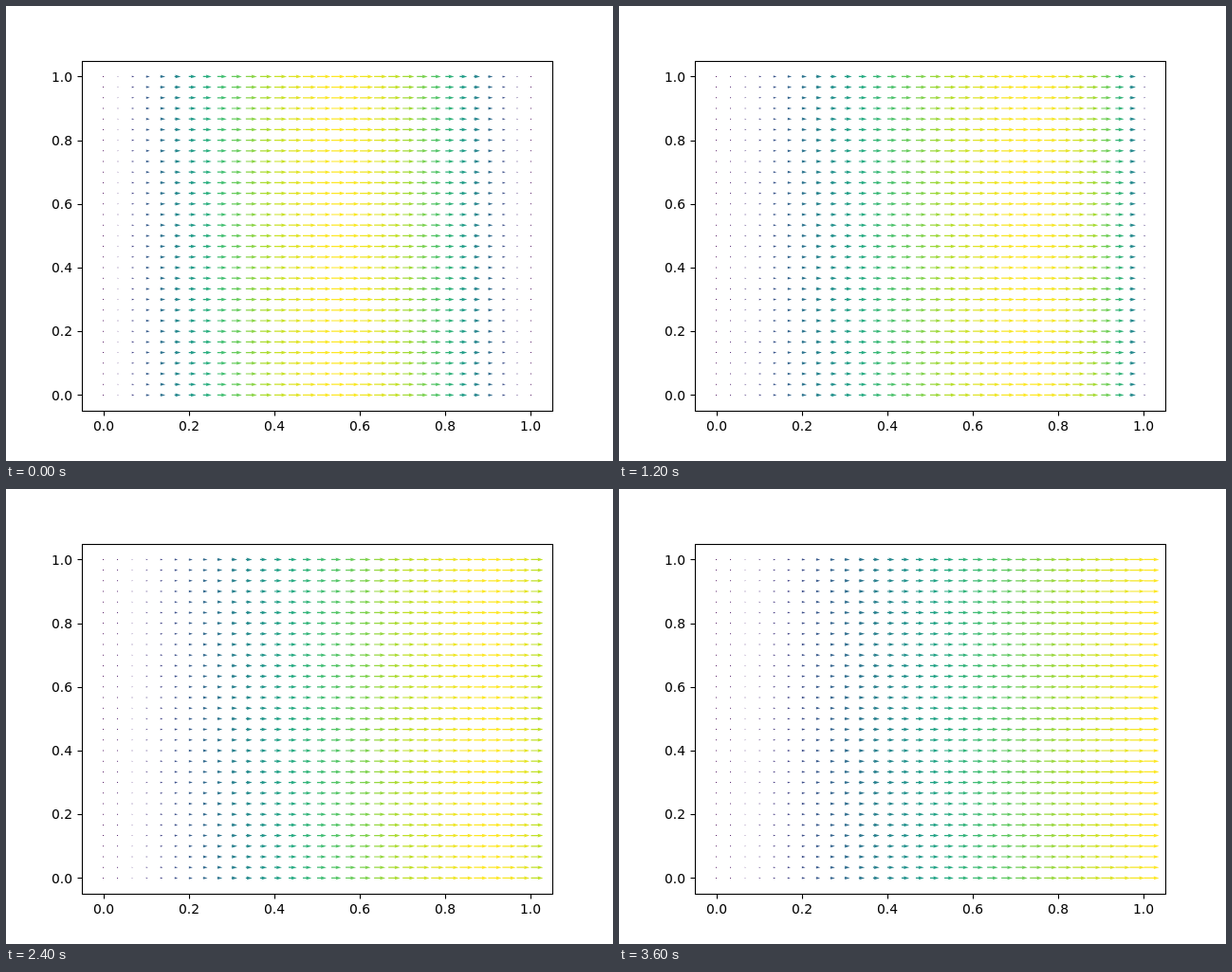
Animation, 640 px wide and 480 px high, one loop 3800 ms. Source, as an HTML page with a canvas:

```html
<!DOCTYPE html>
<html lang="en">
<head>
<meta charset="utf-8">
<title>Vector field</title>
<style>
  html, body { margin: 0; width: 100%; height: 100%; overflow: hidden; background: #fff; }
  canvas { display: block; }
</style>
</head>
<body>
<canvas id="stage" width="640" height="480"></canvas>
<script>
const ctx = document.getElementById('stage').getContext('2d');

const CELLS = 30, STEPS = 19, STEP_MS = 200;
const AXES = { left: 80, right: 576, top: 57.6, bottom: 427.2 };
const AXES_WIDTH = AXES.right - AXES.left;
const SHAFT = 0.0024 * AXES_WIDTH;
const HEAD = 5, HEAD_AXIS = 4.5, HEAD_HALF = 1.5;

const VIRIDIS = ['440154', '482576', '414487', '35608d', '2a788e', '21908c',
                 '22a884', '43bf71', '7ad151', 'bbdf27', 'fde725']
  .map(hex => [0, 2, 4].map(i => parseInt(hex.slice(i, i + 2), 16)));

const toX = v => AXES.left + AXES_WIDTH * (v + 0.05) / 1.1;
const toY = v => AXES.bottom - (AXES.bottom - AXES.top) * (v + 0.05) / 1.1;
const snap = v => Math.floor(v + 0.5) + 0.5;

function colour(t) {
  const pos = Math.max(0, Math.min(1, t)) * (VIRIDIS.length - 1);
  const i = Math.min(Math.floor(pos), VIRIDIS.length - 2);
  const rgb = VIRIDIS[i].map((c, k) => Math.round(c + (VIRIDIS[i + 1][k] - c) * (pos - i)));
  return `rgb(${rgb})`;
}

// One implicit step of u_t + u u_x = 0, with the time step equal to the cell size.
function advance(u) {
  const next = [0];
  for (let i = 1; i <= CELLS; i++) {
    const w = next[i - 1];
    const p = u[i] + u[i - 1] - w + w * w;
    next.push((Math.sqrt(Math.max(0, 1 + 4 * p)) - 1) / 2);
  }
  return next;
}

const fields = [];
let field = Array.from({ length: CELLS + 1 }, (_, i) => Math.sin(Math.PI * i / CELLS));
for (let n = 0; n < STEPS; n++) fields.push(field = advance(field));

// Outline along +x in units of the shaft width.
function arrowOutline(length) {
  const size = Math.abs(length);
  if (size < 1) {
    return Array.from({ length: 6 }, (_, i) =>
      [Math.cos(i * Math.PI / 3) / 2, Math.sin(i * Math.PI / 3) / 2]);
  }
  const shrink = Math.min(1, size / HEAD);
  const full = Math.max(size, HEAD);
  const half = [[0, 0.5], [full - HEAD_AXIS, 0.5], [full - HEAD, HEAD_HALF], [full, 0]];
  const mirrored = half.slice(0, 3).reverse().map(([x, y]) => [x, -y]);
  return half.concat(mirrored).map(([x, y]) => [x * shrink * Math.sign(length), y * shrink]);
}

function drawArrows(u) {
  const speeds = u.map(Math.abs);
  const mean = speeds.reduce((a, b) => a + b) / speeds.length;
  const low = Math.min(...speeds), high = Math.max(...speeds);
  const pixelsPerUnit = AXES_WIDTH / (1.8 * mean * (CELLS + 1));
  u.forEach((value, i) => {
    const outline = arrowOutline(value * pixelsPerUnit / SHAFT);
    const x0 = toX(i / CELLS);
    ctx.fillStyle = colour((speeds[i] - low) / (high - low));
    for (let row = 0; row <= CELLS; row++) {
      const y0 = toY(row / CELLS);
      ctx.beginPath();
      for (const [x, y] of outline) ctx.lineTo(x0 + x * SHAFT, y0 + y * SHAFT);
      ctx.fill();
    }
  });
}

function line(x1, y1, x2, y2) {
  ctx.beginPath();
  ctx.moveTo(x1, y1);
  ctx.lineTo(x2, y2);
  ctx.stroke();
}

function drawAxes() {
  const left = snap(AXES.left), bottom = snap(AXES.bottom);
  ctx.strokeStyle = ctx.fillStyle = '#000';
  ctx.lineWidth = 10 / 9;
  ctx.font = '13.889px "DejaVu Sans", sans-serif';
  ctx.strokeRect(left, snap(AXES.top), AXES_WIDTH, bottom - snap(AXES.top));
  for (let i = 0; i <= 5; i++) {
    const v = i / 5, x = toX(v), y = toY(v), label = v.toFixed(1);
    line(snap(x), bottom, snap(x), bottom + 5);
    line(left, snap(y), left - 5, snap(y));
    ctx.fillText(label, Math.round(x - 11.04), 448);
    ctx.fillText(label, 48, Math.round(y + 5.2));
  }
}

let shown = -1;
function tick() {
  const step = Math.floor(performance.now() / STEP_MS) % STEPS;
  if (step !== shown) {
    shown = step;
    ctx.fillStyle = '#fff';
    ctx.fillRect(0, 0, 640, 480);
    drawArrows(fields[step]);
    drawAxes();
  }
  requestAnimationFrame(tick);
}
tick();
</script>
</body>
</html>
```
